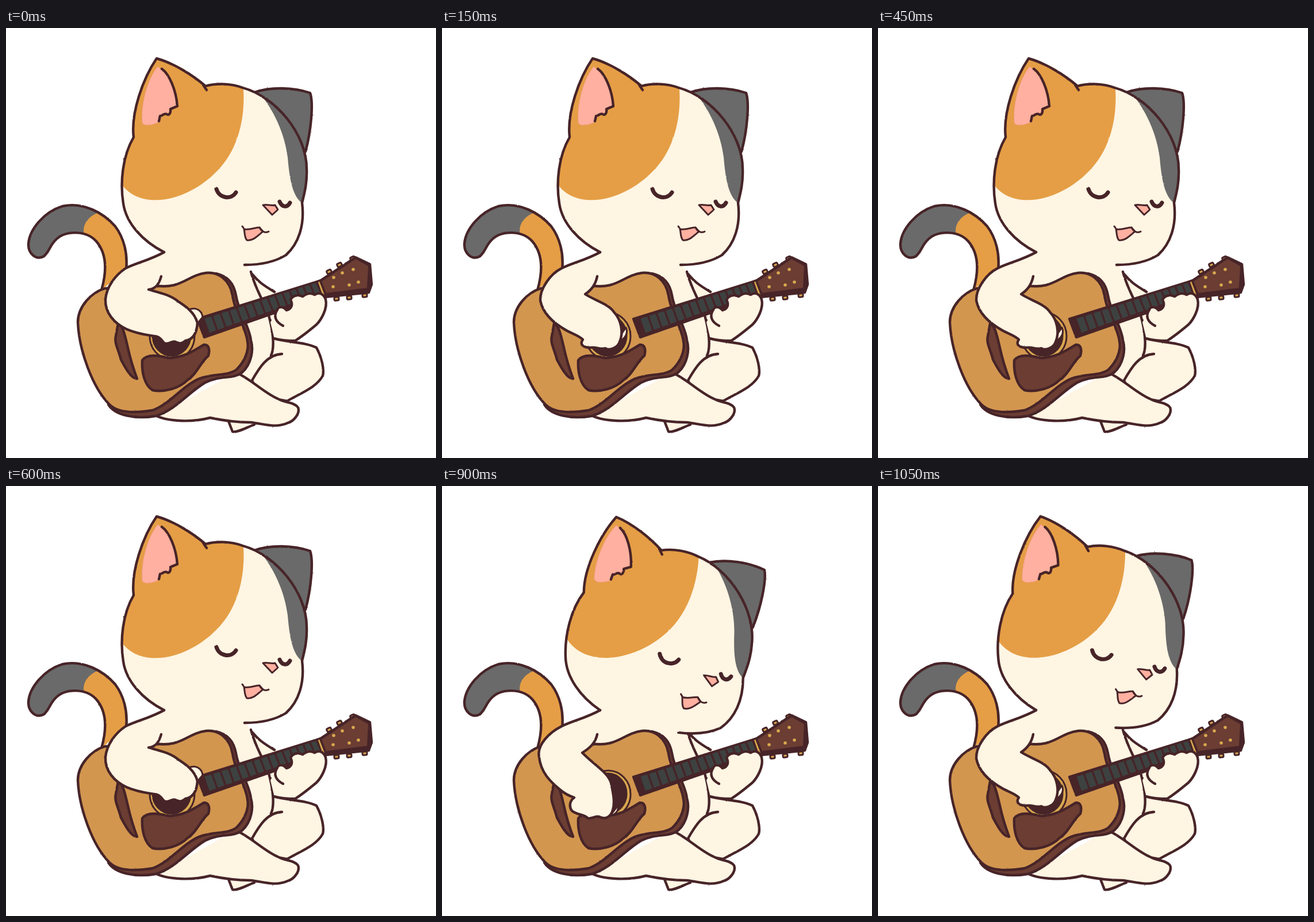
Write an HTML page that moves like this. It is 748 px wide and 748 px high and loops after 1200 ms.

```html
<!DOCTYPE html>
<html lang="en">
<head>
<meta charset="utf-8">
<title>Cat playing guitar</title>
<style>
html, body { margin: 0; width: 100%; height: 100%; overflow: hidden; background: #fff; }
svg { display: block; width: 100%; height: 100%; }
.ink { stroke: #472428; stroke-width: 4.4; stroke-linecap: round; stroke-linejoin: round; }
.thin { stroke-width: 3; }
.bold { stroke-width: 7; }
.none { fill: none; }
.cream { fill: #fff5e3; }
.orange { fill: #e59e45; }
.gray { fill: #6a6a6a; }
.pink { fill: #ffb0a0; }
.wood { fill: #d2964f; }
.brown { fill: #6b3d33; }
.dark { fill: #472428; }
.gold { fill: #d9a84e; }
</style>
</head>
<body>
<svg viewBox="0 0 748 748">
<defs>
  <filter id="rough" x="0" y="0" width="748" height="748" filterUnits="userSpaceOnUse" color-interpolation-filters="sRGB">
    <feTurbulence type="fractalNoise" baseFrequency=".3" numOctaves="1" seed="4"/>
    <feDisplacementMap in="SourceGraphic" scale="2" xChannelSelector="R" yChannelSelector="G"/>
  </filter>
  <path id="tailShape" d="M166 456C175 425 176 393 157 371C140 352 103 351 86 369C76 379 76 388 66 397C52 405 38 392 39 375C41 350 66 320 98 310C135 302 170 322 190 345C205 365 212 392 209 420"/>
  <path id="headShape" d="M275 390C238 371 209 340 204 305C198 268 203 222 222 190C217 148 238 88 262 53C292 61 326 83 347 101C368 95 393 97 412 104C470 120 523 185 523 245C524 270 519 288 515 304C520 343 509 375 487 395C466 408 440 412 415 412"/>
  <clipPath id="tailClip"><use href="#tailShape"/></clipPath>
  <clipPath id="headClip"><use href="#headShape"/></clipPath>
</defs>
<g filter="url(#rough)">
  <g id="tail">
    <use href="#tailShape" class="orange"/>
    <path clip-path="url(#tailClip)" class="gray" d="M160 321C142 329 132 342 136 360L100 420H20V290H150Z"/>
    <use href="#tailShape" class="ink none"/>
  </g>

  <g id="body">
    <path class="cream" d="M275 388L415 405L427 428C436 436 441 443 467 459L545 462L520 530L502 544L465 541L484 570L428 613L400 602L220 560L183 442L208 418Z"/>
    <path class="ink cream" d="M465 540C488 547 520 546 540 556C549 572 554 594 551 605C540 625 515 634 489 649L440 640L428 613C440 592 454 568 480 567"/>
    <path class="ink none" d="M426 424C434 455 450 478 457 500C464 525 468 555 461 570M428 428C438 440 445 446 467 459"/>
    <path class="ink cream" d="M387 684L394 702C401 705 420 694 432 690"/>
    <path class="ink cream" d="M400 599C428 612 448 634 473 645C486 653 500 650 508 660C512 670 501 684 490 687C468 697 447 688 425 686C395 686 374 682 355 678C325 686 285 685 262 675"/>
  </g>

  <g id="head">
    <path class="ink gray" d="M432 112C460 102 500 103 529 113C535 130 531 178 521 215"/>
    <use href="#headShape" class="cream"/>
    <g clip-path="url(#headClip)">
      <path class="orange" d="M412 95C418 150 406 210 367 249C318 300 234 322 198 268L190 40H380Z"/>
      <path class="gray" d="M436 108C466 140 485 185 490 225C493 260 498 294 516 305L540 300V100Z"/>
    </g>
    <path class="pink" stroke="#f09a70" d="M264 67C281 80 298 108 298 137L286 141L283 151L272 150L267 163C258 168 241 173 237 165C234 140 243 92 264 67Z"/>
    <path class="ink none" d="M271 71C284 80 296 108 298 136L286 141C287 147 284 153 280 150C274 147 272 154 268 153L266 162"/>
    <use href="#headShape" class="ink none"/>
    <path class="ink none" d="M343 99L349 108"/>
    <path class="ink bold none" d="M366 280C371 297 392 299 400 286"/>
    <path class="ink bold none" d="M476 302C480 312 489 313 494 304"/>
    <path class="ink thin pink" d="M447 308C455 306 461 310 468 308L473 316L463 325Z"/>
    <path class="ink thin pink" d="M414 350C426 352 435 346 441 347L447 354C438 361 430 371 419 369C414 363 416 357 414 350Z"/>
    <path class="ink thin none" d="M411 345L415 350M441 347C445 355 452 357 457 354"/>
  </g>

  <g id="guitar">
    <path class="ink brown" d="M178 655C190 674 225 681 260 675C293 666 316 635 346 617C374 603 394 612 411 599C427 584 431 560 426 543C423 518 405 496 400 465C396 444 386 432 365 427L300 560L240 640Z"/>
    <path class="ink wood" d="M172 453C148 460 125 485 125 512C127 560 150 625 180 655C195 670 225 670 255 665C284 655 305 624 336 610C362 600 384 606 400 595C416 580 423 560 420 545C417 520 398 495 394 465C389 438 370 424 348 426C315 430 305 455 260 448Z"/>
    <path class="ink brown" d="M195 514C203 516 207 535 212 556C217 580 222 594 228 610C218 611 207 590 200 577C196 560 188 548 191 536Z"/>
    <ellipse class="ink thin gold" cx="289" cy="536" rx="39" ry="41"/>
    <ellipse class="ink thin dark" cx="288" cy="535" rx="33" ry="35"/>
    <path class="ink brown" d="M237 578C246 566 266 570 284 574C312 573 330 559 344 551C353 550 355 560 352 570C338 582 332 602 315 613C300 628 272 634 255 630C240 621 236 597 237 578Z"/>
    <path class="ink dark" d="M333 506L545 440L555 465L345 538Z"/>
    <g id="frets"></g>
    <g id="pegs"></g>
    <path class="ink dark" d="M546 440L608 399L633 411L636 446L631 460L554 468Z"/>
    <path class="brown" d="M549 441L608 402L630 414L628 452L557 461Z"/>
    <path class="ink thin gold" d="M541 441L546 439L556 465L550 467Z"/>
    <g id="dots"></g>
  </g>

  <path class="cream" d="M472 490C474 484 482 484 488 491C498 488 499 480 495 473C498 465 508 463 516 467C522 462 530 460 537 464C546 458 553 464 556 472C560 488 548 508 540 516C528 526 516 536 503 544L467 541L460 512Z"/>
  <path class="ink none" d="M482 518C470 512 464 502 472 490C474 484 482 484 488 491C498 488 499 480 495 473C498 465 508 463 516 467C522 462 530 460 537 464C546 458 553 464 556 472C560 488 548 508 540 516C528 526 516 536 503 544C490 544 478 543 467 540"/>

  <g id="arm">
    <path id="pick" class="ink thin cream"/>
    <path id="armFill" class="cream"/>
    <path id="armLine" class="ink none"/>
  </g>
</g>
</svg>
<script>
const $ = id => document.getElementById(id);
const STEP = 150, STEPS = 8, TILT = 3.5;

// Strumming arm from high to low: outline after the shoulder, and the pick.
const arms = [
  {
    line: "C190 430 175 450 173 472C172 495 188 514 210 524C228 532 245 534 258 536C266 536 270 542 275 548C284 552 288 543 295 546C304 551 308 547 312 544C326 542 332 530 333 513C328 494 312 484 300 476C286 464 266 460 248 455C260 454 266 446 270 432",
    pick: "M318 490C332 484 341 493 342 503L333 514Z"
  },
  {
    line: "C188 428 170 454 171 474C176 500 198 516 218 527C228 532 240 536 245 542C238 552 248 556 258 556C268 554 276 560 284 557C292 562 306 556 309 546C316 530 312 508 299 494C290 480 266 474 249 463C260 456 267 447 270 432",
    pick: "M311 534L320 521C324 530 320 538 310 545Z"
  },
  {
    line: "C188 428 164 450 169 472C172 498 188 514 205 528C214 536 224 540 230 542C220 549 222 560 226 565C236 573 246 570 254 578C264 579 268 572 275 576C286 581 294 574 297 564C302 548 296 528 294 516C288 498 268 488 244 464C257 456 267 447 270 432",
    pick: "M293 573L306 556C308 564 302 572 293 573Z"
  }
];

// Fretboard tiles lie between two edges that run together towards the nut.
const edge = (u, v) => [
  336 + 206 * u + (9 - u) * v,
  508 - 66 * u + (26 - 7 * u) * v
].map(n => n.toFixed(1)).join(" ");
let tiles = "";
for (let i = 0; i < 15; i++) {
  const place = k => .045 + .955 * (k / 15) * (1.14 - .14 * k / 15);
  const a = place(i), b = place(i + 1) - .016;
  tiles += `<path fill="#3d4241" d="M${edge(a, .02)}L${edge(b, .02)}L${edge(b, .98)}L${edge(a, .98)}Z"/>`;
}
$("frets").innerHTML = tiles;

$("pegs").innerHTML = [[562, 424], [580, 412], [603, 401], [575, 471], [597, 469], [624, 465]]
  .map(([x, y]) => `<rect class="ink thin gold" x="${x - 4}" y="${y - 3}" width="8" height="6" rx="2" transform="rotate(${y < 440 ? -25 : -5} ${x} ${y})"/>`)
  .join("");

$("dots").innerHTML = [[570, 434], [585, 426], [604, 420], [569, 450], [597, 447], [613, 442]]
  .map(([x, y]) => `<circle class="gold" cx="${x}" cy="${y}" r="2.8"/>`)
  .join("");

let shown = -1;
function draw(t) {
  const step = Math.floor(t / STEP) % STEPS;
  if (step === shown) return;
  shown = step;
  const pose = [0, 1, 2, 1][step % 4];
  const line = "M275 390C250 404 228 408 208 418" + arms[pose].line;
  $("armLine").setAttribute("d", line);
  $("armFill").setAttribute("d", line + "Z");
  $("pick").setAttribute("d", arms[pose].pick);
  const tilt = step < 4 ? 0 : pose * TILT;
  $("head").setAttribute("transform", `rotate(${tilt} 275 390)`);
}

const start = performance.now();
function tick() {
  draw(performance.now() - start);
  requestAnimationFrame(tick);
}
tick();
</script>
</body>
</html>
```
